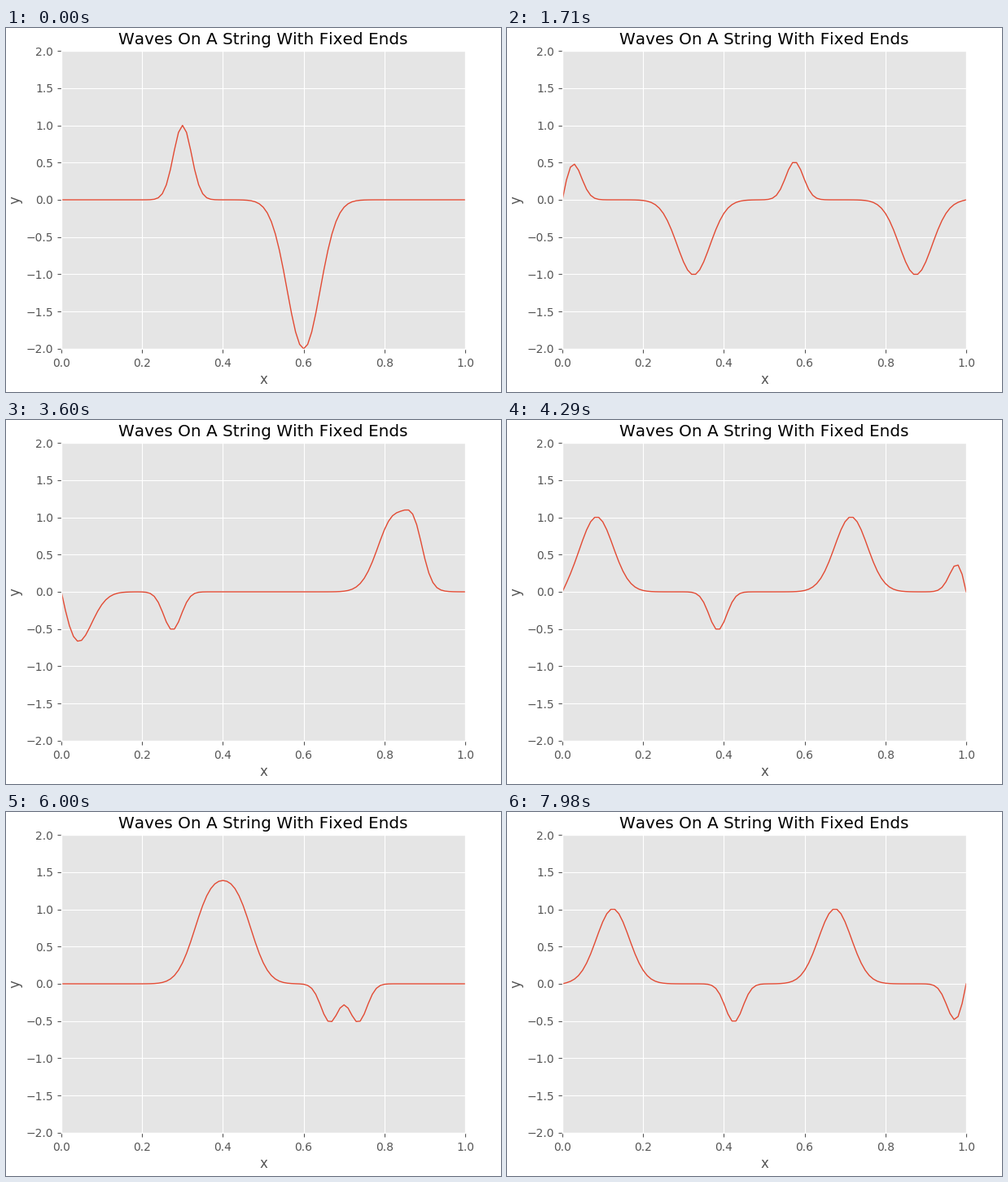
Recreate the animation shown at these times as a matplotlib script. Size 608 px wide and 447 px high, loop 8000 ms.

```python
import numpy as np
import matplotlib.pyplot as plt
from matplotlib.animation import FuncAnimation

W, H, DPI = 608, 447, 100
LOOP, TICK = 8000, 16           # ms
STEP, LEAD = 62.36, 75          # ms per wave step, head start


def pulse(x, centre, height, sharpness):
    return height * np.exp(-sharpness * (x - centre) ** 2)


def solve(u, steps):
    """Leapfrog wave equation at unit Courant number, fixed ends, from rest."""
    u = u.copy()
    u[0] = u[-1] = 0
    states = [u, u]
    for _ in range(steps - 1):
        old, now = states[-2:]
        new = np.zeros_like(now)
        new[1:-1] = now[2:] + now[:-2] - old[1:-1]
        states.append(new)
    return states


x = np.linspace(0, 1, 101)
states = solve(pulse(x, 0.3, 1, 1000) + pulse(x, 0.6, -2, 300), 130)

plt.style.use("ggplot")
plt.rcParams["font.family"] = "DejaVu Sans"
plt.rcParams["text.kerning_factor"] = 6

fig = plt.figure(figsize=(W / DPI, H / DPI), dpi=DPI, facecolor="white")
left, top, width, height = 68, 28.1, 496, 365.8
ax = fig.add_axes([left / W, 1 - (top + height) / H, width / W, height / H])
ax.set_xlim(0, 1)
ax.set_ylim(-2, 2)
ax.tick_params(axis="x", pad=4.2)
ax.set_title("Waves On A String With Fixed Ends")
ax.set_xlabel("x", labelpad=3.2)
ax.set_ylabel("y", labelpad=3.2)
line, = ax.plot(x, states[0], lw=1)


def update(i):
    line.set_ydata(states[int((i * TICK + LEAD) / STEP)])
    return line,


anim = FuncAnimation(fig, update, frames=LOOP // TICK, interval=TICK,
                     init_func=lambda: update(0), repeat=True, repeat_delay=0)
plt.show()
```
